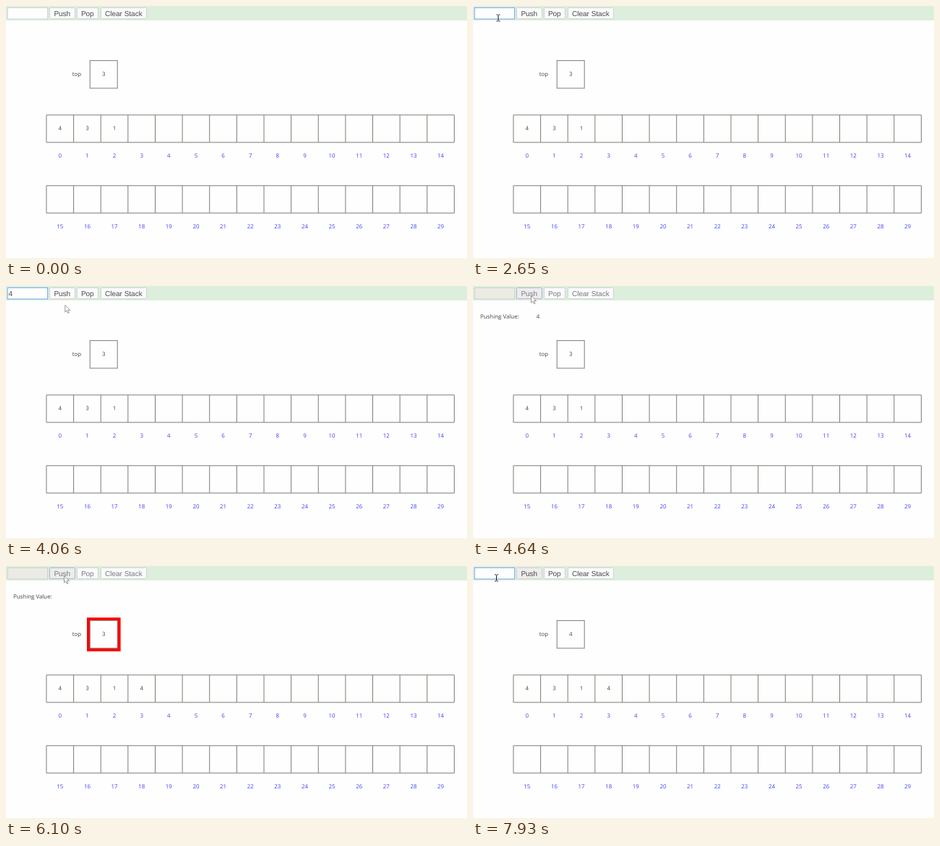
Recreate the animation shown at these times as an HTML page. Size 638 by 349 pixels, loop 8 s.

```html
<!DOCTYPE html>
<html lang="en">
<head>
<meta charset="utf-8">
<title>Array stack</title>
<style>
  html, body { margin: 0; width: 100%; height: 100%; overflow: hidden; background: #fdfefd; }
  svg { display: block; width: 638px; height: 349px; text-rendering: geometricPrecision; }
  text { font: 7.9px "Open Sans", "Noto Sans", sans-serif; fill: #444; }
  .mid { text-anchor: middle; }
  .index { fill: #4040ff; }
  .ui { font: 10px "Liberation Sans", Arial, sans-serif; fill: #484848; }
  .off .ui { fill: #767a7c; }
  .line { fill: none; stroke: #7d7d76; }
  .box { fill: #fbfafd; stroke: #cbd3cd; }
</style>
</head>
<body>
<svg id="stage" viewBox="0 0 638 349"></svg>
<script>
const LOOP = 8000, BLINK = 530;
const CELL = 37.63, LEFT = 55.95;
const stage = document.getElementById('stage');

function add(tag, attrs, parent = stage) {
  const el = document.createElementNS('http://www.w3.org/2000/svg', tag);
  for (const k in attrs) el.setAttribute(k, attrs[k]);
  return parent.appendChild(el);
}
function label(str, x, y, cls = 'mid', parent = stage) {
  const el = add('text', { x, y, class: cls }, parent);
  el.textContent = str;
  return el;
}
const show = (el, on) => { el.style.display = on ? '' : 'none'; };
const place = (el, [x, y]) => el.setAttribute('transform', `translate(${x.toFixed(2)} ${y.toFixed(2)})`);

// Toolbar
const bar = add('g', {});
add('rect', { width: 638, height: 20, fill: '#ddeedd' }, bar);
const input = add('rect', { x: 2.2, y: 2.4, width: 55.4, height: 15.6, class: 'box' }, bar);
const [push] = [['Push', 60, 35], ['Pop', 98, 29], ['Clear Stack', 131, 63]].map(([name, x, w]) => {
  const box = add('rect', { x: x + .4, y: 2.4, width: w, height: 15.3, rx: 1, class: 'box' }, bar);
  label(name, x + w / 2 + .3, 13.5, 'ui mid', bar);
  return box;
});
const typed = label('4', 3.4, 13.5, 'ui', bar);
const caret = add('rect', { y: 5, width: 1, height: 11, fill: '#222' }, bar);

// Array rows
const colX = i => LEFT + i * CELL;
const midX = i => colX(i + .5);
[150.9, 248.8].forEach((y, row) => {
  let d = `M${colX(0)} ${y}H${colX(15)}M${colX(0)} ${y + 38}H${colX(15)}`;
  for (let i = 0; i <= 15; i++) d += `M${colX(i)} ${y}v38`;
  add('path', { d, class: 'line' });
  for (let i = 0; i < 15; i++) label(row * 15 + i, midX(i), y + 59.2, 'mid index');
});
const values = [4, 3, 1, 4].map((v, i) => label(v, midX(i), 172.3));

// Top pointer
label('top', 91.8, 97.4, '');
const glow = add('rect', { fill: '#f00' });
add('rect', { x: 116.2, y: 75.6, width: 38, height: 38.3, class: 'line', style: 'fill:#fdfefd' });
const topText = label('3', 135.3, 97.3);

// Moving parts
const pushing = label('Pushing Value:', 10, 44.6, '');
const flying = label('4', 0, 2.8);
const ring = add('circle', { r: 15, fill: 'none', stroke: '#0808f0', 'stroke-width': 3 });
const beam = add('path', {
  d: 'M-2.5 -4.5H-.6M.6 -4.5H2.5M0 -4V4M-2.5 4.5H-.6M.6 4.5H2.5', fill: 'none', stroke: '#222', 'stroke-width': 1.1
});
const arrow = add('path', {
  d: 'M.5 .5V10.2L2.8 8.1L4.4 11.8L6 11.1L4.4 7.5H7.5Z', fill: '#fff', stroke: '#8c8c8c', 'stroke-width': .9
});

// [time, x, y]
const mousePath = [
  [110, 502, 326], [300, 400, 259], [500, 205, 125], [700, 75, 45], [890, 30, 16.5],
  [1840, 30, 16.5], [2140, 35, 16.5], [2660, 35, 16.5], [2950, 55, 29], [3390, 76, 40],
  [3720, 129, 96], [3800, 129, 96], [4060, 81.3, 26], [4230, 80, 13], [7070, 80, 13],
  [7400, 36, 15], [7500, 35, 17], [7930, 32.5, 16.5]
];
const ringPath = [[5140, 135, 95], [5470, 188, 207]];
const flyPath = [[5520, 90, 42], [5970, midX(3), 169.5]];

function at(path, t) {
  const n = path.findIndex(p => p[0] > t);
  if (n < 1) return path[n ? path.length - 1 : 0].slice(1);
  const a = path[n - 1], b = path[n], k = (t - a[0]) / (b[0] - a[0]);
  return [a[1] + (b[1] - a[1]) * k, a[2] + (b[2] - a[2]) * k];
}

function render(t) {
  const within = (a, b) => t >= a && t < b;
  const busy = within(4340, 6690);
  const focused = within(1050, 4300) || t >= 7430;

  bar.setAttribute('class', busy ? 'off' : '');
  input.style.fill = busy ? '#ebebe4' : '#fefefe';
  input.style.stroke = focused ? '#6fa8f0' : '';
  push.style.fill = t >= 4270 ? '#eeecef' : '';
  push.style.stroke = within(4200, 7200) ? '#a9b6c4' : '';

  const hasText = within(3100, 4340);
  show(typed, hasText);
  const since = t - (t >= 7430 ? 7430 : t >= 3100 ? 3100 : 1050);
  show(caret, focused && since % (2 * BLINK) < (t >= 7430 ? 500 : BLINK));
  caret.setAttribute('x', hasText ? 9 : 4);

  show(pushing, busy);
  show(flying, within(4340, 5980));
  place(flying, at(flyPath, t));
  show(ring, within(4750, 5980));
  place(ring, at(ringPath, t));
  show(values[3], t >= 5980);

  const lit = within(6000, 6690);
  show(glow, lit);
  if (lit) {
    const w = Math.min(4.3, 4 - (t - 6100) * .0036);
    for (const [k, v] of [['x', 116 - w], ['y', 75.4 - w], ['width', 38.6 + 2 * w], ['height', 38.8 + 2 * w]])
      glow.setAttribute(k, v);
  }
  topText.textContent = t < 6400 ? '3' : '4';

  const pos = at(mousePath, t);
  const overInput = pos[0] < 58 && pos[1] < 19;
  show(beam, t >= 110 && overInput);
  show(arrow, t >= 110 && !overInput);
  place(beam, pos);
  place(arrow, pos);
}

const start = performance.now();
function tick() {
  render((performance.now() - start) % LOOP);
  requestAnimationFrame(tick);
}
tick();
</script>
</body>
</html>
```
